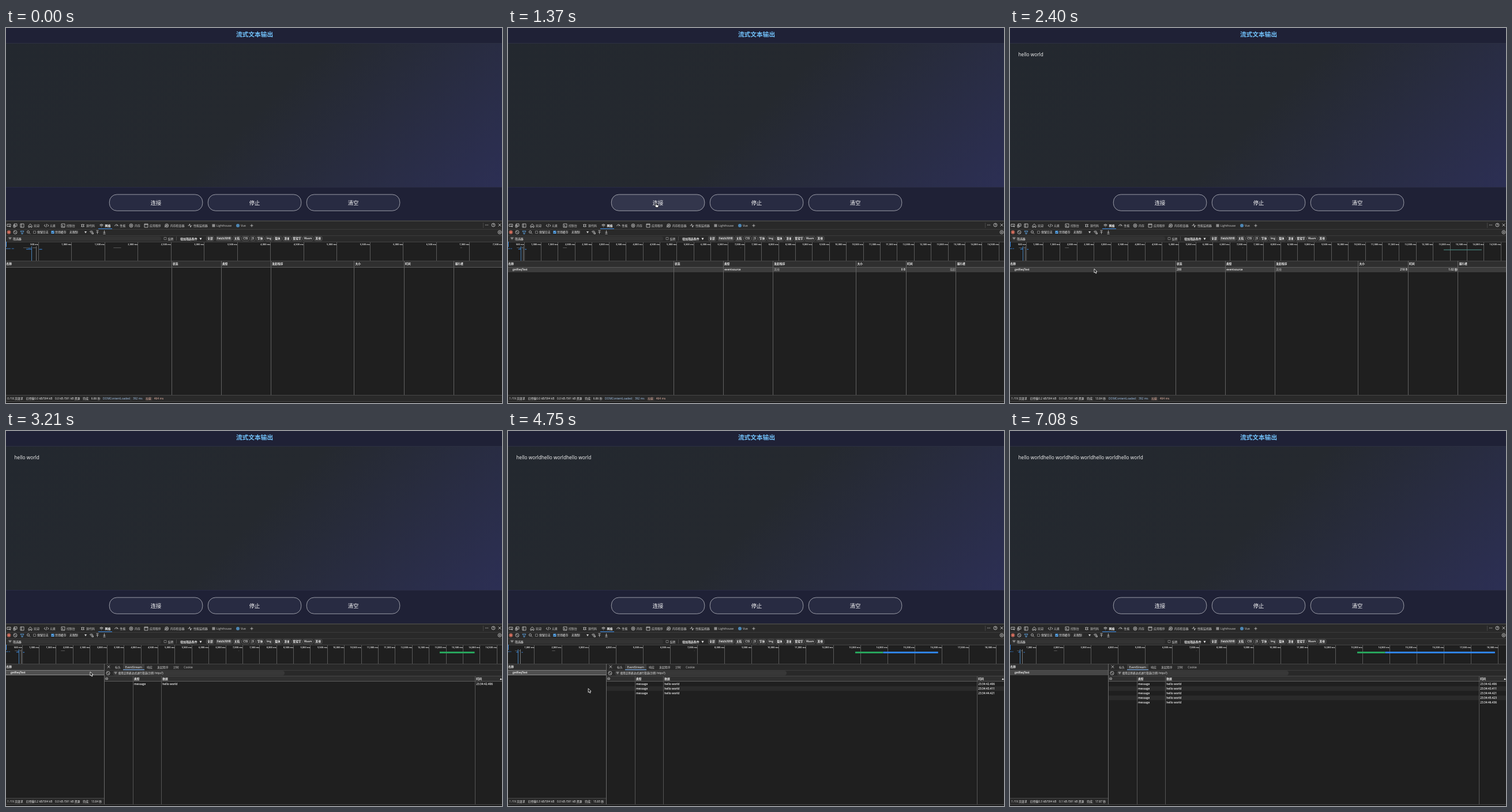
Recreate the animation shown at these times as an HTML page with a canvas. Size 860 by 651 pixels, loop 7.16 s.

```html
<!DOCTYPE html>
<html>
<head>
<meta charset="utf-8">
<style>
html, body { margin: 0; width: 100%; height: 100%; overflow: hidden; background: #1f1f1f; }
canvas { display: block; }
</style>
</head>
<body>
<canvas id="stage" width="860" height="651"></canvas>
<script>
const ctx = document.getElementById('stage').getContext('2d');
const LOOP = 7160, CLICK = 1370, OPEN = 3150;
const MESSAGES = [2390, 3395, 4400, 5405, 6405];
const STAMPS = ['42.406', '43.411', '44.421', '45.423', '46.436'];
const FONT = '"Open Sans", "Noto Sans CJK SC", "Noto Sans CJK", sans-serif';
const INK = '#f4f4f4', DIM = '#cfcfcf', BAR = '#292929', BODY = '#1f1f1f', LINE = '#5a5a5a', BLUE = '#3b8eea';

// Pointer stops: time, x, y
const POINTER = [
  [120, 765, 640], [500, 430, 480], [810, 222, 347], [870, 217, 338], [1120, 256, 302], [1400, 256, 304],
  [1610, 229, 457], [1850, 215, 484], [2270, 146, 418], [3350, 146, 418], [3960, 236, 411], [4080, 236, 411],
  [4210, 240, 416], [4350, 240, 416], [5000, 90, 462], [5470, 83, 465], [5600, 83, 465], [5810, 160, 500], [6405, 330, 630]
];

const clamp = v => Math.max(0, Math.min(1, v));

function rect(x, y, w, h, color) {
  ctx.fillStyle = color;
  ctx.fillRect(x, y, w, h);
}
const hline = (x1, x2, y, color = '#474747') => rect(x1, y, x2 - x1, 1, color);
const vline = (x, y1, y2, color = LINE) => rect(x, y1, 1, y2 - y1, color);

function pill(x, y, w, h, r, fill, stroke, width = .7) {
  ctx.beginPath();
  ctx.roundRect(x, y, w, h, r);
  if (fill) { ctx.fillStyle = fill; ctx.fill(); }
  if (stroke) { ctx.strokeStyle = stroke; ctx.lineWidth = width; ctx.stroke(); }
}

// Laid out ten times larger so that tiny glyphs keep exact advances
function text(str, x, y, color = INK, size = 4.9, align = 'left', weight = 500) {
  ctx.save();
  ctx.translate(x, y + size * .37);
  ctx.scale(.1, .1);
  ctx.font = `${weight} ${size * 10}px ${FONT}`;
  ctx.textAlign = align;
  ctx.fillStyle = color;
  ctx.fillText(str, 0, 0);
  ctx.restore();
}
const cell = (str, x, y, align, color) => text(str, x, y, color, 4.8, align, 600);

function icon(x, y, d, color = DIM, fill = false) {
  ctx.save();
  ctx.translate(x, y);
  const path = new Path2D(d);
  ctx.lineWidth = .8;
  ctx.strokeStyle = ctx.fillStyle = color;
  fill ? ctx.fill(path) : ctx.stroke(path);
  ctx.restore();
}
const RING = 'M3 0A3 3 0 1 1-3 0A3 3 0 1 1 3 0';
const BLOCK = RING + 'M-2-2L2 2';
const FUNNEL = 'M-2.5-1.5H2.5M-1.5 0H1.5M-.5 1.5H.5';
const CROSS = 'M-2.3-2.3L2.3 2.3M-2.3 2.3L2.3-2.3';
const DOWN = 'M-2-1.5H2L0 2Z';
const BOX = 'M-2-2H2V2H-2Z';
const WIFI = 'M-3-1Q0-3.5 3-1M-2 .5Q0-1.3 2 .5M-.4 2H.4';

function page(t, count) {
  rect(0, 0, 860, 335, '#1f2136');
  const g = ctx.createLinearGradient(152, -125, 706, 429);
  g.addColorStop(0, '#23282f');
  g.addColorStop(.5, '#25292f');
  g.addColorStop(.65, '#272b3a');
  g.addColorStop(1, '#2c2f54');
  rect(0, 27, 860, 249, g);
  hline(0, 860, 26, '#2c3042');
  hline(0, 860, 276, '#292b43');
  text('流式文本输出', 431, 11.5, '#72c2fb', 10.7, 'center', 700);
  text('hello world'.repeat(count), 14.5, 45.5, '#fafafa', 8.32, 'left', 400);

  const glow = clamp((t - 1080) / 200) * (1 - clamp((t - 1610) / 300));
  ['连接', '停止', '清空'].forEach((label, i) => {
    const x = 179.3 + i * 171;
    pill(x, 289, 161.5, 28.3, 13, '#282b42', '#b9bac2', .8);
    if (!i && glow) pill(x, 289, 161.5, 28.3, 13, `rgba(255,255,255,${.05 * glow})`);
    text(label, x + 80.8, 303.2, '#f8f8f8', 9.4, 'center', 400);
  });
}

function toolbars(t) {
  rect(0, 334, 860, 317, BAR);
  rect(0, 334, 860, 2, '#404040');
  if (t >= 830 && t < 960) rect(212, 337, 24, 11, '#3d3d3d');

  const tabs = [
    ['欢迎', 48, 'M-3 0L0-3L3 0V3H1V1H-1V3H-3Z'], ['元素', 76, 'M-2-2L-4 0L-2 2M2-2L4 0L2 2M.7-3L-.7 3'],
    ['控制台', 105, 'M-3-3H3V3H-3ZM-2-1L0 .5L-2 2M.5 2H2'], ['源代码', 139, 'M-1.5-2H1.5V2H-1.5ZM-3-2L-1.5-1M3-2L1.5-1M-3 2L-1.5 1M3 2L1.5 1'],
    ['网络', 171.5, WIFI], ['性能', 197.5, 'M-3 1Q-2-2 0-2T3 1M0 1L1.5-1'],
    ['内存', 223, RING + 'M-1-1H1V1H-1Z'], ['应用程序', 249, 'M-3-3H3V3H-3ZM-3-1.5H3'],
    ['内存检查器', 284.7, RING + 'M-1-1H1V1H-1ZM-4 3L-1 0'], ['性能监视器', 325, 'M-3.5 0H-1.5L-.5-3L1 3L2 0H3.5']
  ];
  tabs.forEach(([label, x, d]) => {
    const on = label === '网络';
    icon(x - 6, 343, d, on ? '#fff' : DIM);
    text(label, x, 343, on ? '#fff' : DIM, 4.95, 'left', on ? 700 : 500);
  });
  rect(357.5, 340.5, 5, 5, '#8f8f8f');
  text('Lighthouse', 365, 343, DIM, 5.05);
  icon(402, 343, RING, '#4d86b4', true);
  text('Vue', 407, 343, DIM);
  rect(160, 348, 24, 1, BLUE);
  icon(5, 343, 'M-3-2.5H3V1.5H-3ZM0-1L2.5 3');
  icon(16, 343, 'M-2-3H3V1H-2ZM-3-1H0V3H-3Z');
  icon(28, 343, 'M-3-3H3V3H-3ZM-1-3V3');
  icon(426, 343, 'M-2.5 0H2.5M0-2.5V2.5');
  icon(833.5, 342, 'M-2.5-.5h1v1h-1ZM-.5-.5h1v1h-1ZM1.5-.5h1v1h-1Z', DIM, true);
  icon(845, 342, RING + 'M-1-1Q0-2 1-1Q1 0 0 .5M0 1.2V2');
  icon(856, 342, CROSS);
  vline(827, 338, 347, '#444');
  hline(0, 860, 349, '#3c3c3c');

  icon(5, 354.5, RING, '#d9705f');
  icon(5, 354.5, BOX, '#d9705f', true);
  icon(16, 354.5, BLOCK);
  icon(28, 354.5, 'M-3-2H3L1 .5V3H-1V.5Z', '#62aef0');
  icon(39, 354, 'M1.5 0A2 2 0 1 1-2.5 0A2 2 0 1 1 1.5 0M1 1.5L3 3.5');
  icon(49.5, 354.5, BOX, '#8a8a8a');
  text('保留日志', 54, 354.5);
  rect(78.5, 352, 5, 5, '#58aaf3');
  icon(81, 354.5, 'M-1.5 0L-.4 1.2L1.6-1.2', '#1b1b1b');
  text('禁用缓存', 85, 354.5);
  text('无限制', 110, 354.5);
  icon(138, 354.5, DOWN, DIM, true);
  icon(148, 354.5, WIFI + 'M1 1H3.5V3H1Z');
  icon(158.5, 354.5, 'M-2-3H2M0 3V-1.5M-2 .5L0-1.5L2 .5');
  icon(170.5, 354.5, 'M-2 3H2M0-3V1.5M-2-.5L0 1.5L2-.5');
  icon(856, 354.5, RING + 'M1 0A1 1 0 1 1-1 0A1 1 0 1 1 1 0');
  hline(0, 860, 360, '#3c3c3c');

  pill(2, 362, 267, 7.5, 3.5, '#333');
  icon(7, 365.5, FUNNEL);
  text('筛选器', 12, 365.7);
  icon(276, 365.5, BOX, '#8a8a8a');
  text('反转', 280.7, 365.7);
  vline(295, 362, 369, '#4a4a4a');
  text('增加筛选条件', 302, 365.7, INK, 4.95, 'left', 700);
  icon(337.5, 366, DOWN, INK, true);
  const chips = [['全部', 347.5, 13], ['Fetch/XHR', 364, 27.5], ['文档', 393.8, 13.4], ['CSS', 409, 12.7], ['JS', 423.5, 9],
    ['字体', 434.3, 13], ['Img', 449.5, 12.5], ['媒体', 464, 14], ['清单', 480, 14], ['套接字', 496, 17.3], ['Wasm', 515, 17.3], ['其他', 534.5, 13.5]];
  chips.forEach(([label, x, w], i) => {
    pill(x, 362, w, 7.3, 2, i === 1 ? '#464646' : null, i === 1 ? '#555' : '#757575', .6);
    text(label, x + w / 2, 365.7, '#fff', 4.7, 'center', 600);
  });
}

function timeline(t, count) {
  rect(0, 371, 860, 33, BODY);
  hline(0, 860, 371, '#444');
  const wide = count > 1;
  const unit = wide ? 1000 : 500;
  const step = wide ? 47.1 : t < CLICK ? 57.5 : 29.4;
  const scale = step / unit;
  for (let k = 1; k * step < 875; k++) {
    const x = k * step - 1.2;
    vline(Math.floor(x), 372, 404, LINE);
    text((k * unit).toLocaleString('en-US') + ' ms', x - .5, 376, '#fff', 4, 'right', 600);
  }
  const dash = (from, to, y, color, h = 1) => rect(from * scale, y, (to - from) * scale, h, color);
  dash(0, 70, 382.5, '#3674b8');
  dash(85, 120, 382.5, '#3674b8');
  dash(305, 390, 383.5, BLUE);
  dash(335, 375, 381.5, '#3674b8');
  dash(500, 545, 383.7, BLUE);
  dash(260, 340, 381, '#555');
  dash(405, 450, 381, '#666');
  dash(1620, 1735, 381, '#555');
  dash(6850, 6875, 381, '#4c4c4c');
  vline(Math.round(392 * scale) - 1, 379, 404, '#4a83b8');
  vline(Math.round(464 * scale) - 1, 379, 404, '#777');
  rect(0, 371, 1, 9, BLUE);
  if (count) {
    const x = 12810 * scale - 1.3, first = 13840 * scale - 1.3;
    if (t < OPEN) rect(x, 384.5, 13910 * scale - x, 1.2, '#47867f');
    else {
      rect(x, 383, first - x, 3, '#28a45c');
      rect(first, 383, (count - 1) * 1010 * scale, 3, '#2f83ee');
    }
  }
}

function status(t, count, width) {
  ctx.save();
  ctx.beginPath();
  ctx.rect(0, 637, width, 11);
  ctx.clip();
  rect(0, 637, width, 11, BAR);
  hline(0, width, 637);
  const idle = t < CLICK;
  text(idle ? '0 /18 次请求' : '1 /19 次请求', 2.2, 642.7);
  text(`已传输${['0.0', '0.2', '0.2'][count] || '0.3'} kB/594 kB`, 34.5, 642.7);
  text(`${count > 3 ? '0.1' : '0.0'} kB /591 kB 资源`, 85, 642.7);
  const done = ['6.86', '13.84', '14.84', '15.85', '16.86', '17.87'][count];
  text(`完成：${done} 秒`, 133, 642.7);
  const shift = count ? 3 : 0;
  text('DOMContentLoaded：392 ms', 168 + shift, 642.7, '#a9cdf5');
  text('加载：464 ms', 242 + shift, 642.7, '#f3bfae');
  ctx.restore();
}

function requestList(t, count) {
  rect(0, 404, 860, 11, '#2f2f2f');
  hline(0, 860, 404);
  hline(0, 860, 415, LINE);
  if (t >= CLICK) {
    rect(0, 416, 860, 8, '#3c3c3c');
    const tone = count ? INK : '#949494';
    cell('getReqText', 8, 419.7);
    cell('eventsource', 375.2, 419.7);
    cell('其他', 461.3, 419.7, 'left', '#949494');
    if (count) cell('200', 289, 419.7);
    cell(count ? '218 B' : '0 B', 689, 419.7, 'right');
    cell(count ? '1.02 秒' : '挂起', 775.8, 419.7, 'right', tone);
  }
  const columns = [['名称', .5], ['状态', 289], ['类型', 375], ['发起程序', 461.3], ['大小', 605.5], ['时间', 692], ['履行者', 778.7]];
  columns.forEach(([label, x], i) => {
    cell(label, x, 409.3);
    if (i) vline(Math.round(x - 2.3), 404, 637, '#626262');
  });
  status(t, count, 860);
}

function details(t, count) {
  rect(0, 404, 860, 11, BAR);
  hline(0, 860, 404);
  rect(0, 405, 170, 10, '#2f2f2f');
  hline(0, 170, 415, LINE);
  cell('名称', .5, 409.3);
  const focused = t < 7080;
  rect(0, 415.5, 170, 8.5, focused ? '#505050' : '#474747');
  if (focused) {
    hline(0, 170, 415, '#7d7d7d');
    hline(0, 170, 423, '#8c8c8c');
  }
  cell('getReqText', 8, 419.7, 'left', '#fff');

  rect(203, 405, 37, 10, t > 3850 && t < 4150 ? '#4a4a4a' : '#3c3c3c');
  rect(203, 414, 37, 1, '#7db4f5');
  icon(178, 409.3, CROSS);
  const tabs = [['标头', 189], ['EventStream', 206.7], ['响应', 244], ['发起程序', 262], ['计时', 290], ['Cookie', 308.3]];
  tabs.forEach(([label, x], i) => text(label, x, 410.5, i === 1 ? '#fff' : DIM));

  rect(170, 415, 690, 11, BAR);
  hline(170, 860, 415, '#3c3c3c');
  icon(177, 420.3, BLOCK);
  pill(185, 416.2, 298, 8, 4, t > 4130 && t < 4400 ? '#444' : '#383838');
  icon(190, 420.3, FUNNEL);
  text('使用正则表达式进行筛选(示例: https?)', 194.7, 420.3, INK, 4.6);

  rect(170, 426, 690, 9, '#2f2f2f');
  hline(170, 860, 425);
  hline(170, 860, 434, LINE);
  for (let i = 0; i < count; i++) {
    const y = 439 + i * 8.07;
    if (i % 2) rect(170, y - 4, 690, 8, '#2a2a2a');
    cell('message', 222, y);
    cell('hello world', 271.3, y);
    cell('23:34:' + STAMPS[i], 815.3, y);
  }
  [['ID', 172], ['类型', 222], ['数据', 271.3], ['时间', 815.3]].forEach(([label, x], i) => {
    cell(label, x, 430.3);
    if (i) vline(Math.round(x - 2.2), 426, 648, '#555');
  });
  icon(858, 430.5, 'M-1.7 1.5H1.7L0-1.7Z', INK, true);
  vline(170, 404, 648, '#6a6a6a');
  status(t, count, 170);
}

function pointer(t) {
  const next = POINTER.findIndex(p => p[0] > t);
  if (next < 1) return;
  const [a, b] = [POINTER[next - 1], POINTER[next]];
  const u = (t - a[0]) / (b[0] - a[0]), e = u * u * (3 - 2 * u);
  const x = a[1] + (b[1] - a[1]) * e, y = a[2] + (b[2] - a[2]) * e;
  const hand = (y < 349 && y > 336) || (y > 289 && y < 317) || (y > 405 && y < 414 && x > 203 && x < 240);
  ctx.save();
  ctx.translate(x, y);
  const shape = new Path2D(hand
    ? 'M0 .5Q.8-.4 1.6 .5V3L4.6 3.6Q5.3 4 5 5.2L4.3 7.6H1L-1.6 4.8Q-1.5 3.7 0 4.4Z'
    : 'M0 0V7L1.6 5.6L2.8 8.1L4 7.5L2.9 5.1H5Z');
  ctx.lineJoin = 'round';
  ctx.lineWidth = .8;
  ctx.fillStyle = hand ? '#fff' : '#111';
  ctx.strokeStyle = hand ? '#111' : '#fff';
  ctx.fill(shape);
  ctx.stroke(shape);
  ctx.restore();
}

function draw(now) {
  const t = now % LOOP;
  const count = MESSAGES.filter(m => m <= t).length;
  page(t, count);
  toolbars(t);
  timeline(t, count);
  rect(0, 404, 860, 244, BODY);
  (t < OPEN ? requestList : details)(t, count);
  hline(0, 860, 648, '#4a4a4a');
  rect(0, 649, 860, 2, '#1b1b1b');
  pointer(t);
  if (t >= 2940 && t < OPEN) {
    pill(151.5, 426.5, 106, 13, 1.5, '#2d2d2d', '#565656');
    text('localhost:3000/api/stream/getReqText', 155, 433);
  }
  requestAnimationFrame(draw);
}
requestAnimationFrame(draw);
</script>
</body>
</html>
```
